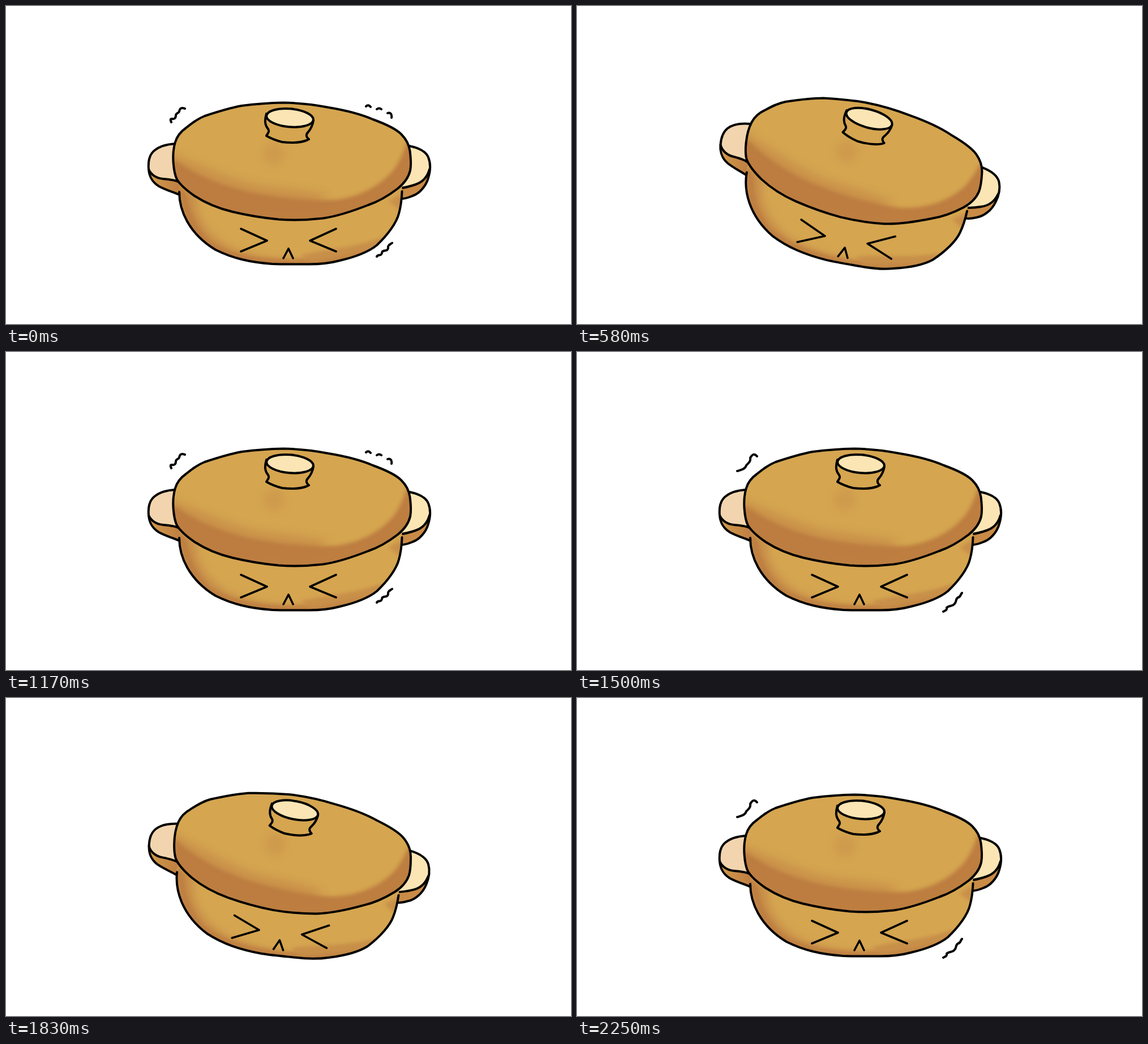
An HTML page that plays this animation: 998 px wide and 561 px high, repeating every 2330 ms.

```html
<!DOCTYPE html>
<html lang="en">
<head>
<meta charset="utf-8">
<title>Shaking pot</title>
<style>
  html, body { margin: 0; width: 100%; height: 100%; overflow: hidden; background: #fff; }
  svg { display: block; width: 100%; height: 100%; }
  .line { fill: none; stroke: #000; stroke-width: 4; stroke-linecap: round; stroke-linejoin: round; }
  .face { stroke-width: 3.6; }
  .base { fill: #d5a550; }
  .dark { fill: #bc7c41; }
  .mid { fill: #c88f49; }
  .mark { visibility: hidden; }
</style>
</head>
<body>
<svg viewBox="0 0 998 561">
  <defs>
    <path id="lid" d="M299 240C302 230 308 222 318 215C328 207 338 199 351 194C375 186 395 180 416 176C440 173 465 171 490 170.5C520 171 545 174 570 179C600 184 625 190 648 200C670 208 690 218 698 226C706 234 712 244 713.5 256C715 268 716 280 714 290C711 303 702 314 692 322C675 335 655 346 640 351C612 362 585 371 560 374.5C530 378 505 378 482 376.5C455 374 425 369 400 363C375 357 350 346 333 335C320 326 308 316 302 306C296 294 292 262 299 240Z"/>
    <path id="bowl" d="M306 328C306 345 310 362 320 380C333 403 350 418 370 430C400 445 430 452 470 455C490 456 515 455.5 530 455.5C555 456 575 453 590 449C620 442 640 434 655 422C675 403 690 382 694 366C698 352 699 340 699.5 327"/>
    <rect id="rim" x="306" y="305" width="393.5" height="24"/>
    <path id="knob" d="M460 190C456 204 458 211 463 217C466 222 462 225 460 229C470 235 480 238 488 240C505 242 520 241 531 237L535 235C529 230 530 226 534 222C539 216 542 208 543 202"/>
    <path id="left" d="M298 243C285 244 268 248 259 258C252 266 251 277 252 288C253 300 257 310 270 318C283 325 295 328 306 333"/>
    <path id="right" d="M713 247C728 250 741 255 746 267C750 277 750 290 746 303C742 318 730 331 718 335C711 338 705 340 699 340"/>
    <clipPath id="inLid"><use href="#lid"/></clipPath>
    <clipPath id="inBowl"><use href="#bowl"/><use href="#rim"/></clipPath>
    <filter id="soft" x="-30%" y="-30%" width="160%" height="160%"><feGaussianBlur stdDeviation="3"/></filter>
    <filter id="softer" x="-50%" y="-50%" width="200%" height="200%"><feGaussianBlur stdDeviation="7"/></filter>
    <linearGradient id="side">
      <stop offset="0" stop-color="#d09a4b"/>
      <stop offset="1" stop-color="#c07f42"/>
    </linearGradient>
  </defs>

  <g id="pot">
    <!-- handles -->
    <path fill="url(#side)" d="M252 288C256 298 266 304 278 305C290 306 300 307 306 311V333C295 328 283 325 270 318C257 310 253 300 252 288Z"/>
    <path fill="#f2d5ae" d="M298 243C285 244 268 248 259 258C252 266 251 277 252 288C256 298 266 304 278 305C290 306 300 307 306 311Z"/>
    <path class="line" d="M252 288C256 298 266 304 278 305C290 306 300 307 306 311"/>
    <use href="#left" class="line"/>
    <path fill="#c98b46" d="M748 288C744 303 735 311 723 315L692 322L699 340C705 340 711 338 718 335C730 331 742 318 746 303Z"/>
    <path fill="#fce5b4" d="M713 247C728 250 741 255 746 267C750 275 750 282 748 288C744 303 735 311 723 315C712 319 702 321 692 322Z"/>
    <path class="line" d="M748 288C744 303 735 311 723 315C712 319 702 321 692 322"/>
    <use href="#right" class="line"/>

    <!-- bowl -->
    <use href="#rim" class="base"/>
    <use href="#bowl" class="base"/>
    <g clip-path="url(#inBowl)">
      <path class="mid" filter="url(#softer)" d="M300 312L338 332C333 365 352 400 395 425C430 440 470 447 500 449L500 466L380 450L300 390Z"/>
      <path class="dark" filter="url(#soft)" d="M300 312L320 332C323 362 338 392 362 415C400 440 450 446 500 447C560 444 620 430 665 412L650 440L560 466L420 462L330 420Z" opacity=".8"/>
      <path class="mid" filter="url(#soft)" d="M520 440C560 429 620 426 668 408L650 430L540 452Z"/>
      <path class="mid" filter="url(#soft)" d="M676 345L704 328L700 362Z"/>
    </g>
    <use href="#bowl" class="line"/>

    <!-- lid -->
    <use href="#lid" class="base"/>
    <g clip-path="url(#inLid)">
      <path class="mid" filter="url(#softer)" d="M290 255L312 268C360 286 400 306 450 316C500 322 540 326 570 334L540 352L400 345L300 300Z" opacity=".85"/>
      <path class="dark" filter="url(#soft)" d="M290 268L304 275C335 298 385 318 430 328C480 338 530 343 580 342C630 336 665 314 687 286C698 270 703 255 708 240L725 240L720 310L640 370L510 390L380 375L290 315Z" opacity=".95"/>
      <circle class="mid" cx="473" cy="261" r="18" filter="url(#softer)" opacity=".5"/>
    </g>
    <use href="#lid" class="line"/>

    <!-- knob -->
    <use href="#knob" class="base"/>
    <use href="#knob" class="line"/>
    <ellipse cx="501.5" cy="197.3" rx="41.5" ry="16" transform="rotate(5 501.5 197.3)" class="line" style="fill:#fce5b4"/>

    <path class="line face" d="M415 393L461 414L415 433M583 393L537 414L583 433M490 445L499 428L507 445"/>
  </g>

  <!-- shiver marks -->
  <path id="markA" class="line mark" d="M292 205q-3-6 1-6c4 1 7-1 7-6s5-3 6-7c1-6 4-7 10-5M655 442c2-4 6-1 8-4s0-5 4-6 7 0 8-5c-1-5 3-6 7-9M636 177q4-4 8 1M655 182q4-3 8 0M674 189c5-2 8 2 7 8"/>
  <path id="markB" class="line mark" d="M283 210C290 208 297 207 299 200C303 196 307 193 306 187C309 181 313 178 318 184M647 458C650 456 654 456 653 451C657 447 664 449 667 444C671 440 668 436 673 433C678 432 677 428 680 425"/>
  <path id="markC" class="line mark" d="M288 207c5-1 8-4 9-9s6-5 7-10 5-7 11-6M651 450c3-4 7-2 9-6s5-4 8-8 4-9 12-12M652 149q5-4 9 1M672 157q5-2 8 3M690 169q6-1 6 7"/>
</svg>
<script>
  const pot = document.getElementById("pot");
  const marks = [..."ABC"].map(name => document.getElementById("mark" + name));
  const LOOP = 2330, POSES = 14;
  const MARK_AT = { 0: 0, 1: 2, 2: 1, 3: 0, 4: 1, 13: 1 };
  // pose, angle, scale
  const KEYS = [[0, 0, 1], [4, 0, 1], [7, 10.1, 1.004], [8, 6.1, 1], [11, -5.8, 1.038], [13, 0, 1]];

  function poseAt(p) {
    const i = Math.max(1, KEYS.findIndex(key => key[0] >= p));
    const [a, b] = [KEYS[i - 1], KEYS[i]];
    const u = (p - a[0]) / (b[0] - a[0]);
    return [1, 2].map(n => a[n] + (b[n] - a[n]) * u);
  }

  function draw(time) {
    // twelve steps per second, on a 10 ms grid
    const step = Math.floor((Math.floor((time % LOOP) / 10) + 0.5) * 0.12);
    const p = step % POSES;
    const [angle, scale] = poseAt(p);
    pot.setAttribute("transform",
      `translate(499 280.5) rotate(${angle}) scale(${scale}) translate(-499 -280.5)`);
    marks.forEach((mark, i) => {
      mark.style.visibility = MARK_AT[p] === i ? "visible" : "hidden";
    });
  }

  const start = performance.now();
  function tick() {
    draw(performance.now() - start);
    requestAnimationFrame(tick);
  }
  tick();
</script>
</body>
</html>
```
